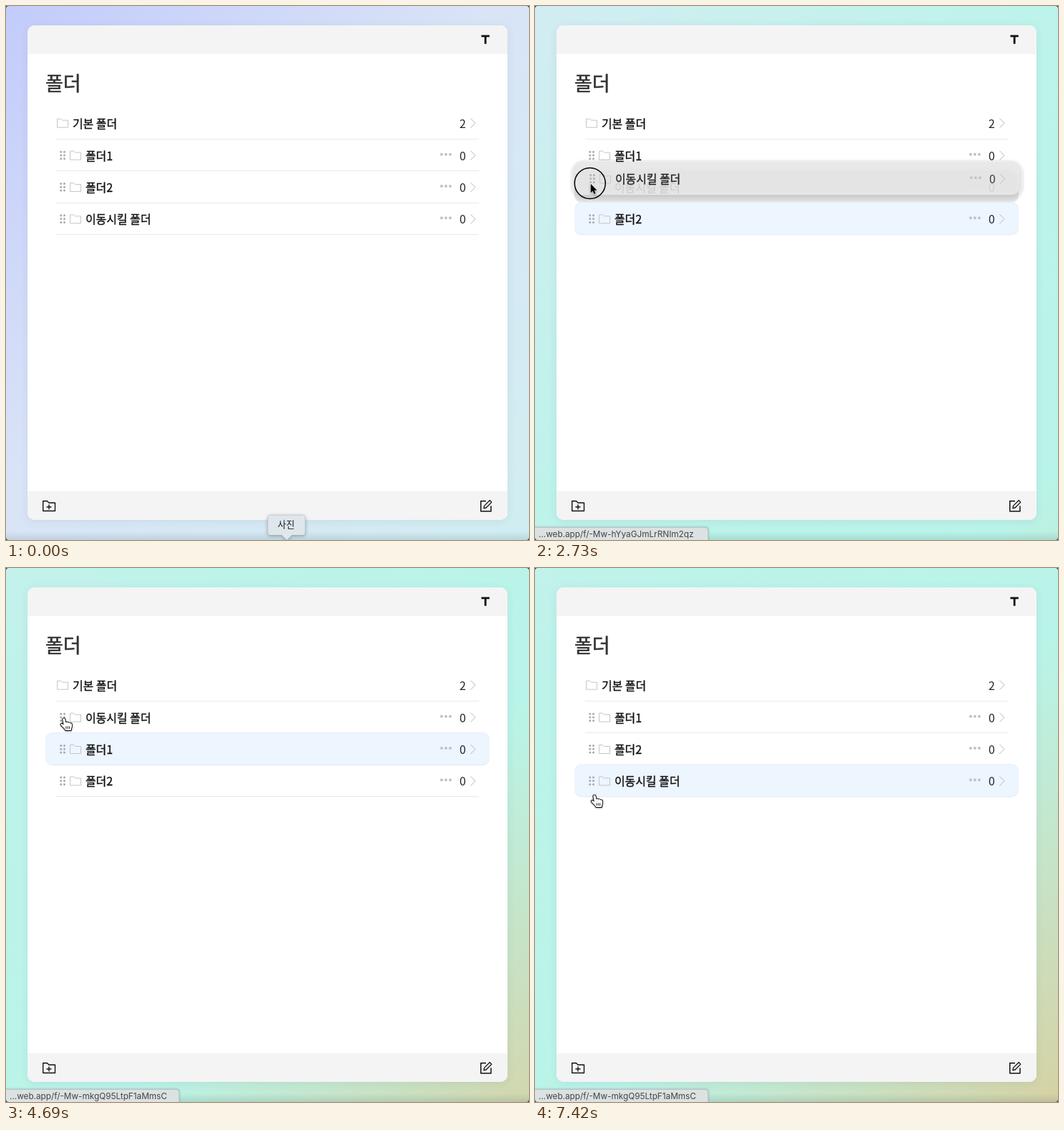
Write an HTML page with a canvas that moves like this. It is 730 px wide and 744 px high and loops after 7490 ms.

```html
<!DOCTYPE html>
<html lang="ko">
<head>
<meta charset="utf-8">
<style>
html, body { margin: 0; width: 100%; height: 100%; overflow: hidden; }
canvas { display: block; }
</style>
</head>
<body>
<canvas id="stage" width="730" height="744"></canvas>
<script>
const W = 730, H = 744, LOOP = 7490;
const ENTER = 140, PRESS = 1260, LINK = 1680, LAG = 140;
const TOP = 185.5, ROW = 44.3, MOVED = 2;
const c = document.getElementById('stage').getContext('2d');
const KR = '"Noto Sans CJK KR", "Noto Sans CJK", sans-serif';
const names = ['폴더1', '폴더2', '이동시킬 폴더'];
const ids = ['hXv3nSd_piinF3yg', 'hYyaGJmLrRNIm2qz', 'mkgQ95LtpF1aMmsC'];
const hues = ['#c3cbfb', '#d9e4f7', '#d2edf2', '#bdf3ea', '#b9f4e8', '#d7d0a0'];

// held from start to end, moving from go to stop
const drags = [
  { start: 1540, go: 1900, stop: 2730, end: 2940, from: 303, to: 247 },
  { start: 3780, go: 3850, stop: 4270, end: 4600, from: 247, to: 208 },
  { start: 6020, go: 6020, stop: 7000, end: 7200, from: 208, to: 315 }
];

const clamp = k => Math.max(0, Math.min(1, k));
const smooth = k => k * k * (3 - 2 * k);
const slotAt = y => Math.max(0, Math.min(2, Math.floor((y - TOP) / ROW)));
const slotY = i => TOP + ROW * i + 23.2;
const dragAt = t => drags.find(d => t >= d.start && t < d.end);

function cursor(t) {
  const left = 1 - clamp((t - ENTER) / 960);
  let x = 75.6 + 314 * left ** 3 + Math.max(0, t - PRESS) / 1250;
  let y = drags[0].from + 449 * left ** 5;
  for (const d of drags) y += (d.to - d.from) * smooth(clamp((t - d.go) / (d.stop - d.go)));
  return [x, y];
}

// the hovered slot stays frozen while a row is held
function hoverAt(t) {
  const d = dragAt(t);
  return t < PRESS ? -1 : slotAt(d ? d.from : cursor(t)[1]);
}

function orderAt(t) {
  const order = [0, 1];
  order.splice(slotAt(cursor(t - LAG)[1]), 0, MOVED);
  return order;
}

function box(x, y, w, h, r, fill) {
  c.beginPath();
  c.roundRect(x, y, w, h, r);
  c.fillStyle = fill;
  c.fill();
}

function line(d, color, width, x = 0, y = 0, fill) {
  c.save();
  c.translate(x, y);
  const p = new Path2D(d);
  c.strokeStyle = color;
  c.lineWidth = width;
  c.lineJoin = 'round';
  c.stroke(p);
  if (fill) { c.fillStyle = fill; c.fill(p); }
  c.restore();
}

function dot(x, y, r, color) {
  c.beginPath();
  c.arc(x, y, r, 0, 7);
  c.fillStyle = color;
  c.fill();
}

function text(s, x, y, font, color, bold = 0) {
  c.font = font;
  c.fillStyle = c.strokeStyle = color;
  c.fillText(s, x, y);
  if (bold) { c.lineWidth = bold; c.lineJoin = 'round'; c.strokeText(s, x, y); }
}

function shadow(color, blur, dy) {
  c.shadowColor = color;
  c.shadowBlur = blur;
  c.shadowOffsetY = dy;
}

function row(name, count, y, dx = 0, movable = true) {
  const x = dx + (movable ? 18 : 0);
  if (movable) {
    for (let i = 0; i < 6; i++)
      dot(dx + 76.7 + i % 2 * 4.8, y - 5.5 + (i >> 1) * 4.8, 1.5, '#aaa');
    for (let i = 0; i < 3; i++) dot(dx + 608 + i * 6, y - 2, 2, '#c2c2c2');
  }
  line('M.5 12.5V.5H5.5L7.5 2.5H15.5V12.5Z', '#c6c6c6', 1, x + 71, y - 7);
  text(name, x + 93, y + 6, '15.9px ' + KR, '#111', .35);
  text(count, dx + 633, y + 6, '16px ' + KR, '#222');
  line('M0 0L6.5 6.5L0 13', '#b8b8b8', 1, dx + 648.5, y - 7);
}

function background(t) {
  // diagonal bands slide towards the top left and slow down
  const unit = (W + H) / 2, span = 2.3 * unit;
  const from = -1.28 * unit * (1 - (1 - clamp(t / 6000)) ** 2);
  const g = c.createLinearGradient(from, from, from + span, from + span);
  hues.forEach((hue, i) => g.addColorStop(i / (hues.length - 1), hue));
  c.fillStyle = g;
  c.fillRect(0, 0, W, H);
  const low = c.createLinearGradient(0, 732, 0, H);
  low.addColorStop(0, 'rgba(60,80,90,0)');
  low.addColorStop(1, 'rgba(60,80,90,.15)');
  c.fillStyle = low;
  c.fillRect(0, 732, W, 12);
}

function card() {
  c.save();
  shadow('rgba(40,70,100,.09)', 13, 2);
  box(30, 27, 670, 689, 10, '#fff');
  c.restore();
  box(30, 27, 670, 40, [10, 10, 0, 0], '#f4f4f4');
  box(30, 676, 670, 40, [0, 0, 10, 10], '#f4f4f4');
  line('M663.5 41.8H674.8M669.2 41.8V52.8', '#111', 2.8);
  line('M51.7 703.5V689.7H57.5L60 692.2H68.5V703.5ZM60 694.5V701.5M56.5 698H63.5', '#111', 1.4);
  line('M670 689.7H662.8V704H677V696.5', '#111', 1.5);
  line('M667 699.8L667.6 696.4L675.2 688.8L677.8 691.4L670.2 699Z', '#111', 1.3);
  text('폴더', 55, 118, '27px ' + KR, '#333', .6);
}

function ghost(t, d) {
  const [x, y] = cursor(t), dx = x - cursor(d.start)[0];
  const cy = slotY(slotAt(d.from)) + y - d.from;
  const seen = Math.min(.88, .15 + (t - d.start) / 750), tone = 250 - 16 * seen;
  box(48 + dx, cy - 27, 634, 57, 20, 'rgba(0,0,0,.045)');
  c.save();
  shadow('rgba(0,0,0,.2)', 7, 1);
  box(55 + dx, cy - 22, 620, 44, 10, `rgba(${tone},${tone},${tone},.87)`);
  c.restore();
  c.save();
  c.globalAlpha = seen;
  row(names[MOVED], '0', cy, dx);
  c.restore();
}

function list(order, hover, held) {
  row('기본 폴더', '2', 163.7, 0, false);
  c.fillStyle = '#e9e9e9';
  for (let i = 0; i < 4; i++) c.fillRect(70, Math.floor(TOP + ROW * i), 590, 1);
  order.forEach((id, i) => {
    const y = slotY(i);
    if (held && id === MOVED) box(55, y - 23, 620, 44, 10, '#e6e6e6');
    else if (hover === i) {
      box(55, y - 24, 620, 46, 10, '#dfeaf6');
      box(55, y - 23.5, 620, 44.5, 10, '#edf5fe');
    }
    row(names[id], '0', y);
  });
}

function pointer([x, y], hand, pressed) {
  if (pressed) {
    c.beginPath();
    c.arc(x, y, 21.5, 0, 7);
    c.strokeStyle = '#000';
    c.lineWidth = 1.5;
    c.stroke();
  }
  c.save();
  shadow('rgba(0,0,0,.3)', 2, 1);
  if (hand) {
    line('M.3 1.5C.3-.6 3-.6 3.5 1.3L4.6 6C5.5 4.8 7.3 5 7.6 6.3C8.5 5.4 10.2 5.8 10.5 7C11.5 6.3 12.8 7 13 8.3C13.5 11.5 12.7 13 12 14.8V16.5H4.3C3.5 14-.5 11.5-2.2 9C-2.8 7.5-1 6.8 .2 8L1.8 9.2Z',
      '#111', 2, x + .5, y + 1.5, '#fff');
    c.shadowColor = 'transparent';
    line('M5 11V14.5M7.3 11V14.5M9.6 11V14.5', '#111', .9, x + .5, y + 1.5);
  } else {
    line('M0 0V12.5L2.8 9.8L4.8 14.2L6.9 13.3L5 9H8.8Z', '#fff', 1.8, x + 1, y + .8, '#000');
  }
  c.restore();
}

function tooltip() {
  c.save();
  shadow('rgba(0,0,0,.25)', 4, 1);
  line('M369.5 709.5H413.5Q417.5 709.5 417.5 713.5V733Q417.5 737 413.5 737H399L392 744L385 737H369.5Q365.5 737 365.5 733V713.5Q365.5 709.5 369.5 709.5Z',
    '#c3cad0', 1, 0, 0, '#dfe6ec');
  c.restore();
  text('사진', 379, 727, '13px ' + KR, '#222');
}

function linkBar(id) {
  c.save();
  shadow('rgba(0,0,0,.25)', 3, 0);
  box(-2, 726, 244, 20, [0, 4, 0, 0], '#bcc3c3');
  c.restore();
  box(-2, 727, 243, 20, [0, 4, 0, 0], '#dce1e1');
  text('...web.app/f/-Mw-' + ids[id], 5, 740, '11.75px Inter, sans-serif', '#444');
}

function corners() {
  for (const x of [0, W]) for (const y of [0, H]) {
    c.beginPath();
    c.moveTo(x, y);
    c.lineTo(x ? x - 4 : 4, y);
    c.quadraticCurveTo(x, y, x, y ? y - 4 : 4);
    c.fillStyle = '#333a48';
    c.fill();
  }
}

function draw(t) {
  const drag = dragAt(t), order = orderAt(t);
  const pressed = drag || t >= PRESS && t < drags[0].start;
  background(t);
  card();
  list(order, hoverAt(t - LAG), drag);
  if (drag) ghost(t, drag);
  if (t < ENTER) tooltip();
  if (t >= LINK) linkBar(order[hoverAt(t)]);
  corners();
  if (t >= ENTER) pointer(cursor(t), t > PRESS && !pressed, pressed);
}

function frame(now) {
  draw(Math.floor(now % LOOP / 70) * 70);
  requestAnimationFrame(frame);
}
requestAnimationFrame(frame);
</script>
</body>
</html>
```
